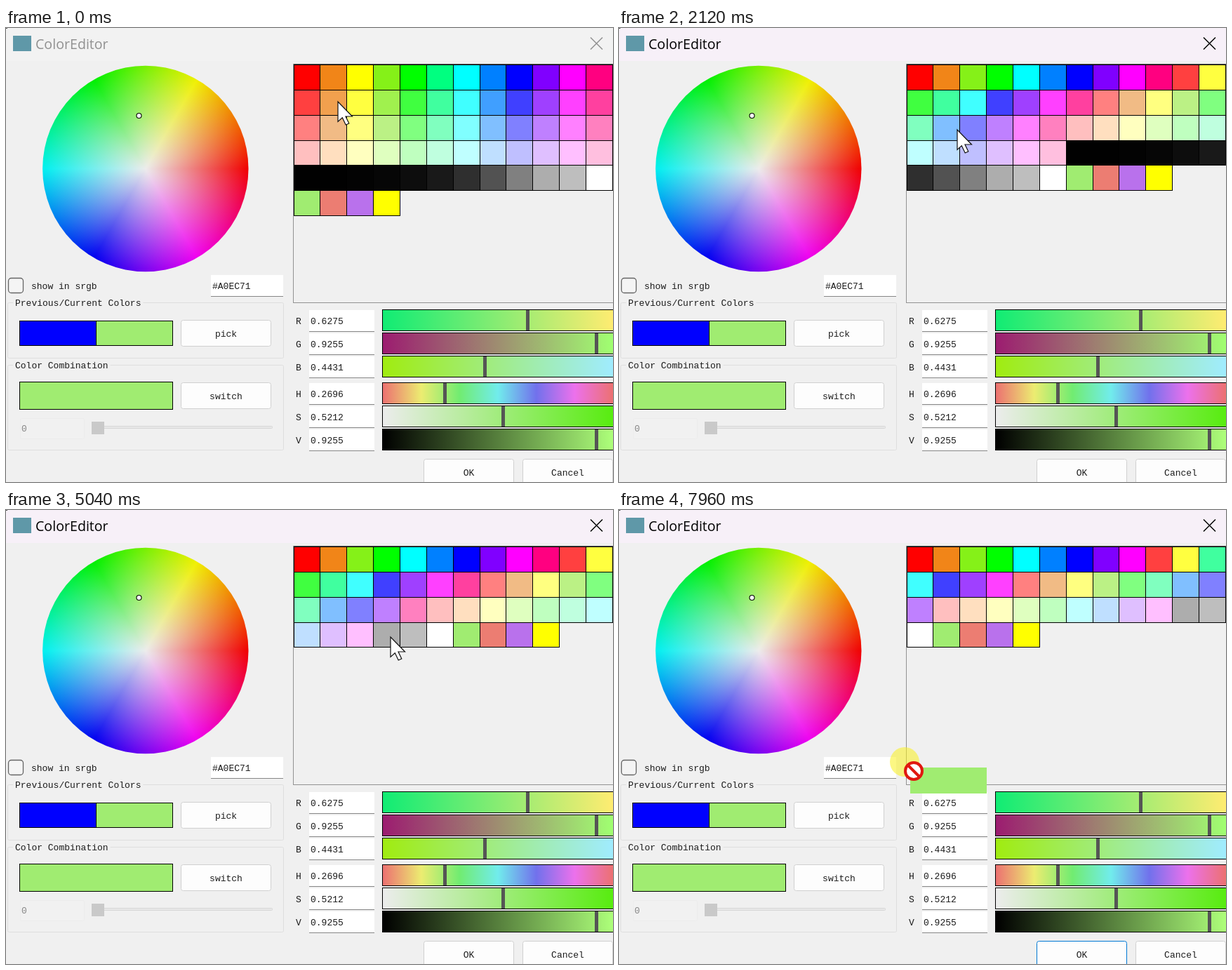
An HTML page with a canvas that plays this animation: 865 px wide and 647 px high, repeating every 8000 ms.

```html
<!DOCTYPE html>
<html lang="en">
<head>
<meta charset="utf-8">
<title>Color editor</title>
<style>
  html, body { margin: 0; width: 100%; height: 100%; overflow: hidden; background: #f0f0f0; }
  canvas { display: block; }
</style>
</head>
<body>
<canvas id="stage" width="865" height="647"></canvas>
<script>
const ctx = document.getElementById('stage').getContext('2d');
const LOOP = 8000, ACTIVATE = 160, PRESS = 7680, DRAG = 7800;
const CURRENT = '#a0ec71', MONO = '13px "Liberation Mono", monospace';

function hsv(h, s, v) {
  const channel = n => {
    const k = (n + h / 60) % 6;
    return Math.round(255 * v * (1 - s * Math.max(0, Math.min(k, 4 - k, 1))));
  };
  return `rgb(${channel(5)},${channel(3)},${channel(1)})`;
}

// Swatches: twelve hues at four saturations, a grey ramp, four custom colours.
const swatches = [];
for (let s = 1; s > 0; s -= 0.25)
  for (let h = 0; h < 360; h += 30) {
    const muted = s > 0.3 && (h === 30 || h === 90);
    swatches.push(muted ? hsv(h, s * 0.9, 0.945) : hsv(h, s, 1));
  }
for (let i = 0; i < 11; i++) swatches.push(hsv(0, 0, Math.min(0.745, 1 / (1 + Math.exp(0.74 * (8 - i))))));
swatches.push('#fff', CURRENT, '#ec7d72', '#b971ec', '#ff0');

const column = i => Math.floor(410 + i * 37.86);
const row = i => Math.floor(52.6 + i * 35.8);

// Each burst removes swatches at a steady pace; the pointer leans sideways from the cell centre.
const bursts = [
  { start: 320, step: 360, lean: -4, picks: [13, 15, 2, 5] },
  { start: 1840, step: 240, lean: 16, picks: [19, 30, 44, 47] },
  { start: 3160, step: 170, lean: 10, picks: [34, 49, 50, 51] },
  { start: 3880, step: 215, lean: 6, picks: [52, 53, 54, 55, 56, 48] },
  { start: 5320, step: 240, lean: -12, picks: [35, 23, 11, 16] },
  { start: 6440, step: 0, lean: 0, picks: [41] }
];

// The pointer rests on every swatch it removes, then fetches the current colour and drags it.
const removedAt = swatches.map(() => Infinity);
const path = [[0, 473, 105]];
const left = swatches.map((_, i) => i);
for (const { start, step, lean, picks } of bursts)
  picks.forEach((pick, n) => {
    const t = start + n * step, cell = left.indexOf(pick);
    const x = column(cell % 12) + 19 + lean, y = row(Math.floor(cell / 12)) + 21;
    path.push([t - 40, x, y], [t + 100, x, y]);
    removedAt[pick] = t;
    left.splice(cell, 1);
  });
path.push([6880, 529, 240], [7600, 150, 443], [7760, 150, 443], [7960, 407, 359], [LOOP, 407, 359]);

function pointerAt(t) {
  const i = path.findIndex(p => p[0] > t);
  const [t0, x0, y0] = path[i - 1], [t1, x1, y1] = path[i];
  const p = (t - t0) / (t1 - t0), e = p * p * (3 - 2 * p);
  return [x0 + (x1 - x0) * e, y0 + (y1 - y0) * e];
}

function rect(x, y, w, h, fill) {
  ctx.fillStyle = fill;
  ctx.fillRect(x, y, w, h);
}
function boxed(x, y, w, h, fill) {
  rect(x, y, w, h, '#000');
  rect(x + 1, y + 1, w - 2, h - 2, fill);
}
function rounded(x, y, w, h, r, fill, stroke, weight = 1) {
  ctx.beginPath();
  ctx.roundRect(x + 0.5, y + 0.5, w - 1, h - 1, r);
  ctx.fillStyle = fill;
  ctx.fill();
  ctx.strokeStyle = stroke;
  ctx.lineWidth = weight;
  ctx.stroke();
}
function disc(x, y, r, fill) {
  ctx.beginPath();
  ctx.arc(x, y, r, 0, 2 * Math.PI);
  ctx.fillStyle = fill;
  ctx.fill();
}
function text(s, x, y, color = '#1c1c1c', font = MONO, align = 'left') {
  ctx.font = font;
  ctx.textAlign = align;
  ctx.fillStyle = color;
  ctx.fillText(s, x, y);
}
function field(s, x, y, w) {
  rect(x, y, w, 30, '#fff');
  rect(x, y + 30, w, 1, '#868686');
  text(s, x + 2, y + 20);
}
function button(label, x, y, h, border = '#d0d0d0') {
  rounded(x, y, 129, h, 3, '#fdfdfd', border);
  text(label, x + 64.5, y + 24, '#1c1c1c', MONO, 'center');
}
function group(title, y, h) {
  rounded(2, y, 394, h, 2, '#f0f0f0', '#dedede');
  rect(10, y - 1, title.length * 7.8 + 6, 3, '#f0f0f0');
  text(title, 13, y + 5);
}

function drawTitle(active) {
  rect(0, 0, 865, 47, active ? '#f7f0f8' : '#f2f2f2');
  rect(0, 0, 2, 1, '#555');
  rect(10, 11, 26, 22, '#5f98a8');
  const color = active ? '#000' : '#919191';
  text('ColorEditor', 42, 30, color, '19.6px "Open Sans", sans-serif');
  ctx.strokeStyle = color;
  ctx.lineWidth = 1.5;
  ctx.beginPath();
  ctx.moveTo(833, 13.5); ctx.lineTo(850, 30.5);
  ctx.moveTo(850, 13.5); ctx.lineTo(833, 30.5);
  ctx.stroke();
}

function drawWheel() {
  const x = 198.8, y = 200.5, r = 146.7;
  const hues = ctx.createConicGradient(0, x, y);
  for (let i = 0; i <= 6; i++) hues.addColorStop(i / 6, hsv(360 - i * 60, 1, 0.94));
  const fade = ctx.createRadialGradient(x, y, 0, x, y, r);
  fade.addColorStop(0, 'rgba(236,236,236,1)');
  fade.addColorStop(1, 'rgba(236,236,236,0)');
  disc(x, y, r, hues);
  disc(x, y, r, fade);
  disc(189.5, 125, 3.5, '#fff');
  ctx.strokeStyle = '#000';
  ctx.lineWidth = 1.1;
  ctx.stroke();
}

function drawLeft() {
  rounded(3, 356, 22, 22, 4, '#f4f4f4', '#666', 1.3);
  text('show in srgb', 36, 372);
  field('#A0EC71', 292, 352, 103);
  group('Previous/Current Colors', 391, 80);
  boxed(19, 417, 219, 36, CURRENT);
  boxed(19, 417, 110, 36, '#00f');
  button('pick', 249, 416, 38);
  group('Color Combination', 480, 122);
  boxed(19, 504, 219, 40, CURRENT);
  button('switch', 249, 505, 38);
  rounded(20, 556, 92, 30, 2, '#f1f1f1', '#ececec');
  text('0', 22, 575, '#888');
  rounded(138, 567, 242, 4, 1, '#e8e8e8', '#d6d6d6');
  rect(122, 561, 18, 18, '#c9c9c9');
}

const sliders = [
  ['R', 0.6275, '#10ec74', '#ffec71'],
  ['G', 0.9255, '#9c1c70', '#a0ff71'],
  ['B', 0.4431, '#a0ec10', '#a0ecff'],
  ['H', 0.2696, ...Array.from({ length: 7 }, (_, i) => hsv(i * 60, 0.5212, 0.9255))],
  ['S', 0.5212, '#ececec', '#58ec10'],
  ['V', 0.9255, '#000', '#adff7a']
];
function drawSliders() {
  sliders.forEach(([name, value, ...stops], i) => {
    const y = 401 + i * 33 + (i > 2 ? 5 : 0);
    text(name, 413, y + 21);
    field(value.toFixed(4), 432, y + 1, 93);
    const fill = ctx.createLinearGradient(537, 0, 865, 0);
    stops.forEach((c, k) => fill.addColorStop(k / (stops.length - 1), c));
    boxed(536, y, 331, 31, fill);
    rect(Math.round(535 + value * 328), y + 1, 5, 29, '#555');
  });
}

function drawPalette(t) {
  rect(409, 51, 456, 1, '#555');
  rect(409, 51, 1, 341, '#929292');
  rect(409, 391, 456, 1, '#929292');
  swatches.filter((_, i) => removedAt[i] > t).forEach((color, i) => {
    const c = i % 12, r = Math.floor(i / 12);
    boxed(column(c), row(r), column(c + 1) - column(c) + 1, row(r + 1) - row(r) + 1, color);
  });
}

const arrow = new Path2D('M0 0V28.5L6.3 22.8L11.2 33L15.8 31L11 21H20.5Z');
function drawPointer(t) {
  ctx.save();
  ctx.translate(...pointerAt(t));
  if (t >= PRESS) disc(0, 0, 21, 'rgba(250,240,30,0.55)');
  if (t >= DRAG) {
    rect(8, 8, 109, 37, CURRENT);
    disc(13, 13, 12, '#fff');
    ctx.moveTo(5, 5);
    ctx.lineTo(21, 21);
    ctx.strokeStyle = '#e01810';
    ctx.lineWidth = 4;
    ctx.stroke();
  } else {
    ctx.fillStyle = '#fff';
    ctx.fill(arrow);
    ctx.strokeStyle = '#111';
    ctx.lineWidth = 1.2;
    ctx.stroke(arrow);
  }
  ctx.restore();
}

function draw(now) {
  const t = now % LOOP;
  rect(0, 0, 865, 647, '#f0f0f0');
  drawTitle(t >= ACTIVATE);
  drawWheel();
  drawLeft();
  drawPalette(t);
  drawSliders();
  button('OK', 595, 614, 40, t >= DRAG ? '#0078d4' : '#d0d0d0');
  button('Cancel', 736, 614, 40);
  drawPointer(t);
  requestAnimationFrame(draw);
}
requestAnimationFrame(draw);
</script>
</body>
</html>
```
